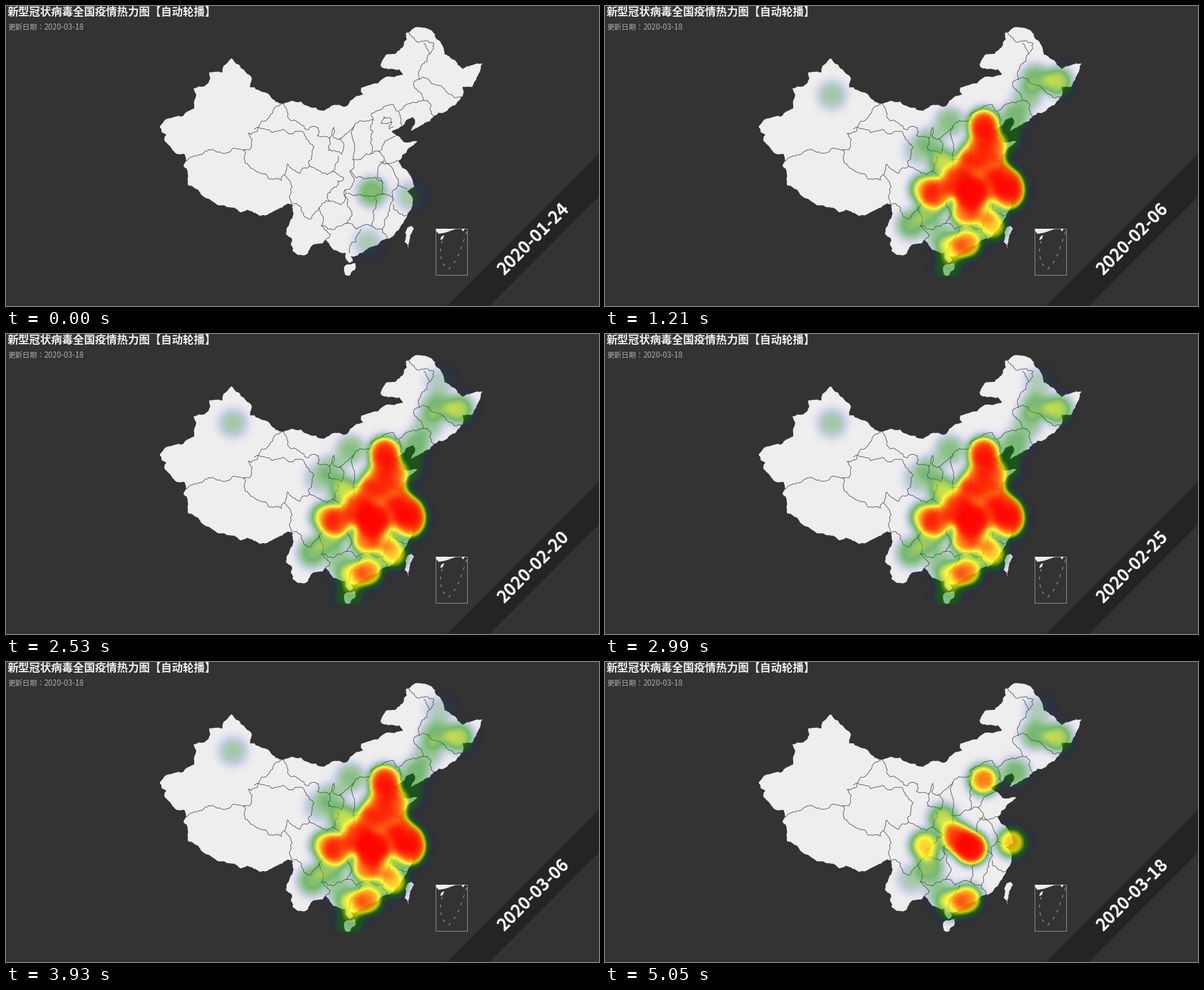
Recreate the animation shown at these times as a matplotlib script. Size 1053 px wide and 532 px high, loop 5.23 s.

```python
import numpy as np
import matplotlib.pyplot as plt
from matplotlib.animation import FuncAnimation
from matplotlib.patches import Polygon, Rectangle

W, H, DPI = 1053, 532, 64
LOOP, TICKS, DAYS = 5230, 174, 55
TICK = LOOP / TICKS
PT = 72 / DPI
CJK = "Noto Sans CJK JP"
DARK, LAND, LINE = "#333333", "#eeeeee", "#444444"
rng = np.random.default_rng(7)

# ---- corners of the map, clockwise from the western tip ----
NORTH = [
    (273, 214), (284, 201), (318, 190), (334, 182), (338, 157), (333, 146),
    (352, 143), (360, 136), (361, 118), (384, 118), (386, 107), (400, 93),
    (418, 111), (434, 124), (433, 144), (462, 154), (486, 173), (535, 177),
    (565, 186), (604, 178), (634, 158), (631, 145), (661, 137), (681, 125),
    (705, 122), (698, 112), (668, 109), (666, 102), (676, 86), (692, 85),
    (705, 72), (712, 59), (710, 48), (737, 38), (757, 45), (771, 63),
    (779, 86), (798, 97), (811, 112), (846, 102), (838, 123), (828, 143),
    (811, 143), (810, 161), (797, 176), (783, 186), (768, 189), (753, 204),
    (719, 221), (726, 209), (722, 197), (709, 205), (697, 217), (685, 222),
    (697, 231), (705, 241), (730, 240), (712, 256), (697, 274)]
SOUTH = [
    (712, 292), (725, 320), (712, 328), (722, 341), (722, 352), (713, 368),
    (702, 388), (684, 410), (655, 425), (634, 437), (612, 443), (616, 452),
    (610, 456), (604, 439), (581, 432), (568, 414), (563, 420), (543, 425),
    (530, 442), (515, 439), (506, 421), (508, 413), (497, 404), (509, 376),
    (508, 352), (500, 350), (473, 365), (451, 372), (428, 361), (417, 366),
    (400, 357), (376, 353), (345, 331), (324, 318), (323, 297), (316, 281),
    (320, 275), (317, 262), (300, 260), (281, 238), (285, 228)]
HAINAN = [(600, 466), (604, 459), (620, 456), (621, 463), (609, 478), (602, 476)]
TAIWAN = [(713, 393), (720, 390), (724, 394), (715, 430), (708, 418), (709, 402)]

# ---- corners of the province borders ----
WEST_LINES = [
    [(320, 275), (345, 264), (388, 261), (405, 252), (433, 255), (437, 236),
     (430, 226), (447, 218), (454, 204), (474, 186), (491, 173)],
    [(422, 254), (425, 279), (445, 294), (489, 309), (497, 293)],
    [(495, 300), (508, 322), (510, 355)],
    [(441, 218), (482, 222), (524, 222), (547, 250), (539, 284), (522, 297),
     (500, 280), (497, 293)],
    [(492, 173), (500, 197), (536, 220), (555, 216), (553, 230), (575, 234),
     (582, 215), (583, 234), (600, 247), (596, 263), (573, 256), (575, 234)],
    [(592, 236), (618, 213), (619, 252), (616, 272), (648, 262), (652, 222),
     (647, 213), (652, 202), (618, 213)],
    [(590, 266), (584, 290), (570, 299), (539, 284)],
    [(616, 272), (610, 294), (616, 303), (602, 326), (606, 350)]]
EAST_LINES = [
    [(652, 202), (650, 190), (672, 178), (688, 175), (700, 193), (703, 212)],
    [(698, 186), (742, 167), (752, 172), (759, 196)],
    [(686, 206), (666, 208), (671, 196), (684, 200), (680, 218), (688, 214)],
    [(712, 46), (730, 64), (760, 66), (748, 98), (732, 118), (734, 130),
     (724, 134), (742, 167)],
    [(742, 66), (752, 84)],
    [(734, 130), (756, 138), (784, 154), (810, 160)],
    [(692, 230), (662, 258), (648, 262)],
    [(662, 258), (672, 272), (661, 292), (669, 314), (669, 334), (688, 343)],
    [(664, 277), (697, 274)],
    [(673, 274), (690, 296), (696, 318), (688, 343), (672, 380), (668, 396),
     (678, 412)]]
SOUTH_LINES = [
    [(696, 318), (712, 324)],
    [(612, 292), (640, 306), (669, 314)],
    [(688, 352), (712, 372)],
    [(606, 333), (645, 338), (669, 334)],
    [(510, 350), (525, 358), (541, 378), (556, 358), (574, 346), (571, 333),
     (600, 306), (579, 293)],
    [(574, 346), (596, 352), (602, 326)],
    [(556, 358), (560, 390), (604, 386), (606, 350)],
    [(560, 390), (576, 405), (568, 414)],
    [(604, 386), (622, 396), (650, 390), (668, 396)],
    [(656, 341), (652, 366), (650, 390)],
    [(630, 396), (610, 438)]]

# ---- heat: waves of sites (x, y, strength) that rise and fade together ----
RISE, FADE = 8, 5            # days a wave takes to grow and to vanish
MID, LATE, NEVER = 42, 48, 99
WAVES = [
    (-2, NEVER, [(650, 330, 5), (643, 421, 2.1)]),
    (-2, LATE, [(717, 337, 2.3)]),
    (0, NEVER, [(625, 312, 3), (764, 129, .7), (545, 385, .35)]),
    (0, LATE, [(640, 365, 2.2), (648, 283, 2.3), (716, 238, .55), (556, 256, .35)]),
    (0, MID, [(684, 318, 2.2), (710, 308, 2), (609, 466, .6)]),
    (3, NEVER, [(722, 320, 1.7), (600, 278, 1.1), (568, 325, 1.6), (576, 364, .8),
                (595, 408, .5), (615, 432, 1.1), (672, 209, 2.2)]),
    (3, LATE, [(590, 332, 2.4), (655, 262, 1.6), (688, 252, 1.8), (578, 240, .45),
               (612, 205, .55)]),
    (3, MID, [(668, 362, 1.2), (690, 285, 2), (688, 390, 1.6), (673, 236, 1.6),
              (674, 213, 1.2)]),
    (5, NEVER, [(804, 134, 1.05), (728, 196, .7)]),
    (5, MID, [(403, 158, .38), (543, 390, .45), (750, 160, .45)]),
    (17, NEVER, [(770, 86, .3)])]

# heat layer window
X0, X1, Y0, Y1 = 350, 880, 20, 480
gx, gy = np.meshgrid(np.arange(X0, X1) + .5, np.arange(Y0, Y1) + .5)


def spot(x, y, strength):
    """A round patch with a flat middle and a soft rim."""
    return strength * np.exp(-(np.hypot(gx - x, gy - y) / 25) ** 3)


def smooth(u):
    u = np.clip(u, 0, 1)
    return u * u * (3 - 2 * u)


FIELDS = [(rise, fade, sum(spot(*s) for s in sites)) for rise, fade, sites in WAVES]
levels = np.linspace(0, 1, 256)
stops = (0, .33, .5, .75, 1)
channels = ((0, 0, 0, 255, 255), (0, 128, 128, 255, 0), (255, 0, 0, 0, 0))
RAMP = np.stack([np.interp(levels, stops, c) for c in channels]
                + [levels * 255], axis=1).round().astype(np.uint8)


def heat(day):
    total = sum(smooth((day - rise) / RISE) * (1 - smooth((day - fade) / FADE)) * f
                for rise, fade, f in FIELDS)
    return RAMP[((1 - np.exp(-total)) * 255).astype(np.uint8)]


def date(day):
    d = 24 + day
    for month, length in ((1, 31), (2, 29), (3, 31)):
        if d <= length:
            return f"2020-{month:02d}-{d:02d}"
        d -= length


def rough(points, amp=.13):
    """Split every long segment at a displaced midpoint until it looks ragged."""
    pts = np.array(points, float)
    while True:
        gaps = np.hypot(*np.diff(pts, axis=0).T)
        if gaps.max() < 4.5:
            return pts
        out = [pts[0]]
        for a, b, gap in zip(pts[:-1], pts[1:], gaps):
            if gap >= 4.5:
                side = np.array([a[1] - b[1], b[0] - a[0]])
                out.append((a + b) / 2 + side * np.clip(rng.normal(0, amp), -.25, .25))
            out.append(b)
        pts = np.array(out)


def land(points):
    shape = Polygon(rough(points + points[:1], .09), fc=LAND, ec=LAND, lw=.3)
    return ax.add_patch(shape)


def label(x, y, text, size, **kw):
    return ax.text(x, y, text, family=CJK, size=size * PT, **kw)


fig = plt.figure(figsize=(W / DPI, H / DPI), dpi=DPI, facecolor=DARK)
ax = fig.add_axes([0, 0, 1, 1])
ax.axis("off")

main = land(NORTH + SOUTH)
land(HAINAN)
land(TAIWAN)
for line in WEST_LINES + EAST_LINES + SOUTH_LINES:
    border, = ax.plot(*rough(line).T, color=LINE, lw=.9 * PT)
    border.set_clip_path(main)
ax.plot([677, 720], [448, 430], "o", color="#777777", ms=1.2, mew=0)

# small inset with the southern islands
ax.add_patch(Rectangle((762.5, 394.5), 56, 82, fill=False, ec="#999999", lw=PT))
for part in ([(763, 395), (800, 395), (780, 402), (768, 404), (764, 399)],
             [(773, 409), (778, 406), (776, 413), (771, 415)],
             [(809, 395), (815, 395), (811, 400)]):
    ax.add_patch(Polygon(part, fc=LAND, ec="none"))
ax.plot([818, 810, 800, 786, 775, 771, 775], [400, 424, 450, 467, 456, 438, 412],
        color="#bbbbbb", lw=PT, ls=(0, (5, 9)))

layer = ax.imshow(heat(0), extent=(X0, X1, Y1, Y0), interpolation="nearest",
                  aspect="auto", zorder=4)

ax.add_patch(Polygon([(1053, 262), (1053, 338), (859, 532), (783, 532)],
                     fc="#242424", ec="none", zorder=5))
stamp = label(937.5, 413, date(0), 30.3, color="white", weight="bold", rotation=45,
              ha="center", va="center", zorder=6)
label(2.5, 16.3, "新型冠状病毒全国疫情热力图【自动轮播】", 19.5, color=LAND, weight="bold")
label(3, 42, "更新日期：", 13, color="#aaaaaa")
label(67.5, 42, "2020-03-18", 13.8, color="#aaaaaa")
ax.set_xlim(0, W)
ax.set_ylim(H, 0)

# moment each day appears: a quicker first week, then an even pace
STARTS = np.interp(range(DAYS), (0, 6, 13, 54), (0, 540, 1210, 5050))


def update(i):
    day = int(np.searchsorted(STARTS, (i + 1) * TICK - 1e-6, side="right")) - 1
    if stamp.get_text() != date(day) or i == 0:
        layer.set_data(heat(day))
        stamp.set_text(date(day))
    return layer, stamp


anim = FuncAnimation(fig, update, frames=TICKS, interval=TICK, repeat=True,
                     repeat_delay=0, cache_frame_data=False)
plt.show()
```
